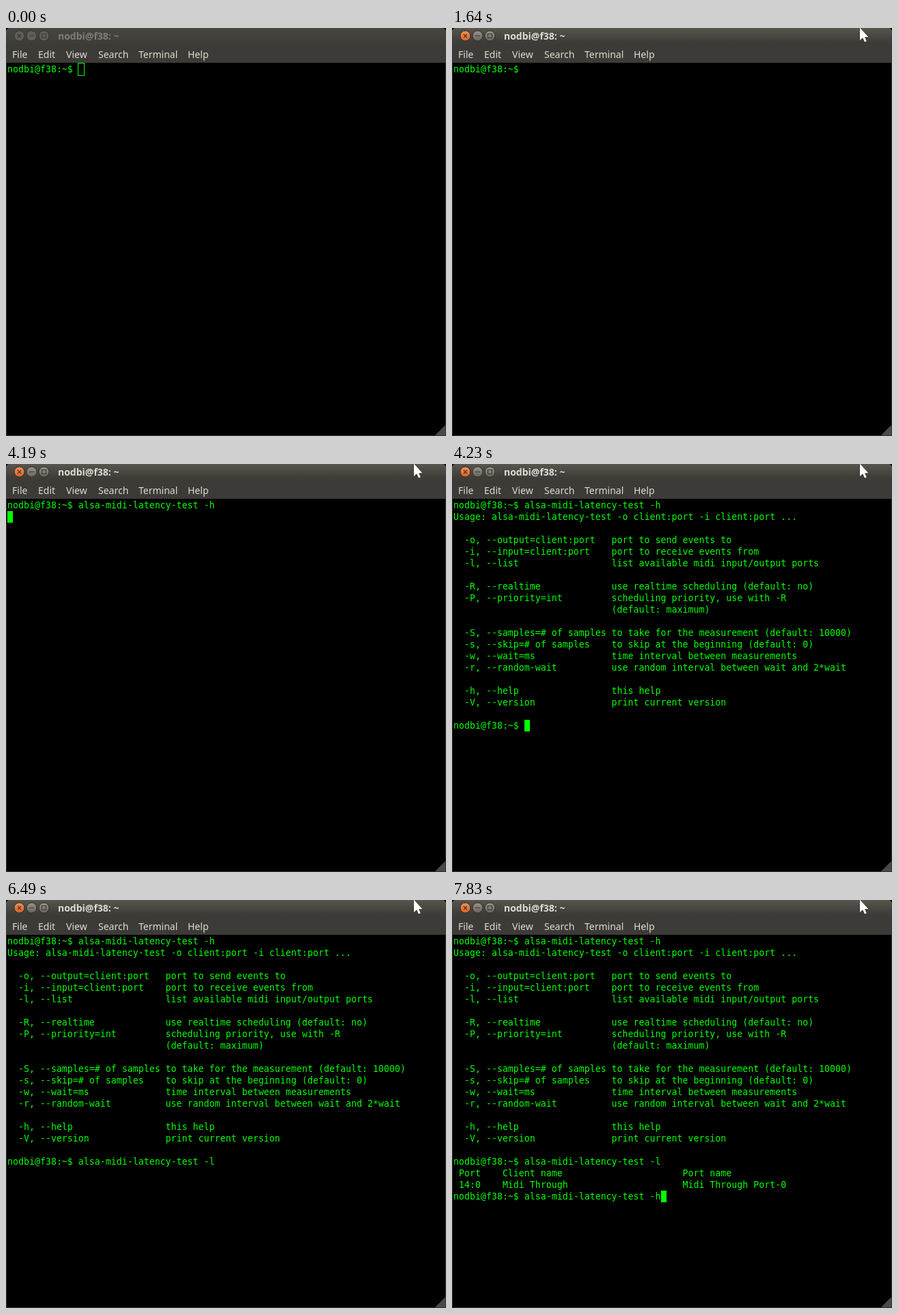
These frames come from a looping animation (644x598 px, 8000 ms). An HTML page:

```html
<!DOCTYPE html>
<html lang="en">
<head>
<meta charset="utf-8">
<title>Terminal</title>
<style>
  html, body { margin: 0; width: 100%; height: 100%; overflow: hidden; background: #000; }
  #win { position: relative; width: 644px; height: 598px; overflow: hidden; background: #000; }
  svg { position: absolute; left: 0; top: 0; }
  .ui { font: 14px "Noto Sans", "Open Sans", sans-serif; fill: #dfdbd2; }
  .title { font-weight: 700; fill: #807d78; }
  .active .title { fill: #dfdbd2; }
  .bar { fill: url(#barOff); }
  .active .bar { fill: url(#barOn); }
  .btn { fill: #605e58; stroke: #33322e; }
  .active .btn { fill: url(#grey); stroke: #2f2e2a; }
  .active .btn.close { fill: url(#orange); }
  .glyph { fill: none; stroke: #383732; stroke-width: 1.1; }
  #screen {
    position: absolute; left: 2px; top: 52px; margin: 0; color: #0f0;
    font: 13.288px/17px "DejaVu Sans Mono", monospace; white-space: pre;
    font-variant-ligatures: none;
  }
  #caret { position: absolute; box-sizing: border-box; width: 8px; height: 17px; background: #0f0; }
  #caret.hollow { width: 10px; height: 19px; margin: -1px; background: none; border: 1px solid #0f0; }
</style>
</head>
<body>
<div id="win">
  <pre id="screen"></pre>
  <div id="caret"></div>
  <svg width="644" height="598" viewBox="0 0 644 598">
    <defs>
      <linearGradient id="barOff" x2="0" y2="1">
        <stop offset="0" stop-color="#484741"/><stop offset="1" stop-color="#3c3b37"/>
      </linearGradient>
      <linearGradient id="barOn" x2="0" y2="1">
        <stop offset="0" stop-color="#58564d"/><stop offset=".75" stop-color="#3e3d39"/><stop offset="1" stop-color="#3c3b37"/>
      </linearGradient>
      <linearGradient id="grey" x2="0" y2="1">
        <stop offset="0" stop-color="#979389"/><stop offset="1" stop-color="#67645c"/>
      </linearGradient>
      <linearGradient id="orange" x2="0" y2="1">
        <stop offset="0" stop-color="#f19158"/><stop offset="1" stop-color="#d9601f"/>
      </linearGradient>
    </defs>
    <rect class="bar" width="644" height="26"/>
    <rect y="26" width="644" height="25" fill="#3c3b37"/>
    <path d="M0 0h4Q1 1 0 4zM644 0h-4q3 1 4 4z" fill="#000"/>
    <path d="M.5 51v546.5h643V51" fill="none" stroke="#33322f"/>
    <path d="M643 582v15h-15z" fill="#4b4a46"/>
    <circle class="btn close" cx="19.5" cy="11.5" r="7.5"/>
    <circle class="btn" cx="37.5" cy="11.5" r="7.5"/>
    <circle class="btn" cx="55.5" cy="11.5" r="7.5"/>
    <path class="glyph" d="M17 9l5 5m0-5l-5 5M34 11.5h7M52.5 8.5h6v6h-6z"/>
    <text class="ui title" x="76" y="17">nodbi@f38: ~</text>
    <g class="ui" id="menu"></g>
    <path id="mouse" d="M0 -.5V18L4.2 14.2 7 20.4 9.8 19.2 7.1 13.2H12.4z"
      fill="#fff" stroke="#222" stroke-width=".7" paint-order="stroke"/>
  </svg>
</div>
<script>
const LOOP = 8000, ENTER = 630, FOCUS = 1050;
const $ = id => document.getElementById(id);
const win = $("win"), screen = $("screen"), caret = $("caret"), mouse = $("mouse");

const items = { File: 9, Edit: 47, View: 88, Search: 135, Terminal: 194, Help: 266 };
$("menu").innerHTML = Object.entries(items)
  .map(([name, x]) => `<text x="${x}" y="44">${name}</text>`).join("");

const prompt = "nodbi@f38:~$ ";
const cmd = "alsa-midi-latency-test ";
const option = (flag = "", info = "") => flag || info ? ("  " + flag).padEnd(29) + info : "";
const usage = [
  "Usage: " + cmd + "-o client:port -i client:port ...",
  option(),
  option("-o, --output=client:port", "port to send events to"),
  option("-i, --input=client:port", "port to receive events from"),
  option("-l, --list", "list available midi input/output ports"),
  option(),
  option("-R, --realtime", "use realtime scheduling (default: no)"),
  option("-P, --priority=int", "scheduling priority, use with -R"),
  option("", "(default: maximum)"),
  option(),
  option("-S, --samples=# of samples", "to take for the measurement (default: 10000)"),
  option("-s, --skip=# of samples", "to skip at the beginning (default: 0)"),
  option("-w, --wait=ms", "time interval between measurements"),
  option("-r, --random-wait", "use random interval between wait and 2*wait"),
  option(),
  option("-h, --help", "this help"),
  option("-V, --version", "print current version"),
  option()
].join("\n") + "\n";
const row = (port, client, name) => ((" " + port).padEnd(9) + client).padEnd(42) + name + "\n";
const list = row("Port", "Client name", "Port name") + row("14:0", "Midi Through", "Midi Through Port-0");

const first = prompt;
const second = first + cmd + "-h\n" + usage + prompt;
const third = second + cmd + "-l\n" + list + prompt;

// time, screen text, caret visible
const steps = [
  [0, first, true],
  [1640, first, false],
  [1770, first + "a", true],
  [1970, first + "al", true],
  [2080, first + "alsa", true],
  [2240, first + "alsa-", true],
  [2530, first + "alsa-m", true],
  [2710, first + cmd, true],
  [3260, first + cmd, false],
  [3640, first + cmd + "-", true],
  [3910, first + cmd + "-h", true],
  [4190, first + cmd + "-h\n", true],
  [4230, second, true],
  [4780, second, false],
  [4820, second + cmd + "-h", true],
  [5210, second + cmd + "-", true],
  [5780, second + cmd + "-", false],
  [5900, second + cmd + "-l", true],
  [6490, second + cmd + "-l", false],
  [6660, third, true],
  [7230, third, false],
  [7600, third + cmd + "-l", true],
  [7830, third + cmd + "-h", true]
];

let shown;
function showStep(step) {
  if (step === shown) return;
  shown = step;
  const [, text, visible] = step;
  const lines = text.split("\n");
  screen.textContent = text;
  caret.style.left = 2 + lines[lines.length - 1].length * 8 + "px";
  caret.style.top = 52 + (lines.length - 1) * 17 + "px";
  caret.style.visibility = visible ? "visible" : "hidden";
}

function moveMouse(t) {
  mouse.style.display = t < ENTER ? "none" : "";
  const tick = Math.floor((t - ENTER) / 42) + 1;
  const left = (1 - Math.min(1, Math.max(0, tick / 9))) ** 2;
  mouse.setAttribute("transform", `translate(${597 + Math.round(50 * left)} ${Math.round(14 * left)})`);
}

function draw() {
  const t = performance.now() % LOOP;
  showStep(steps.findLast(s => s[0] <= t));
  win.classList.toggle("active", t >= FOCUS);
  caret.classList.toggle("hollow", t < FOCUS);
  moveMouse(t);
  requestAnimationFrame(draw);
}
draw();
</script>
</body>
</html>
```
